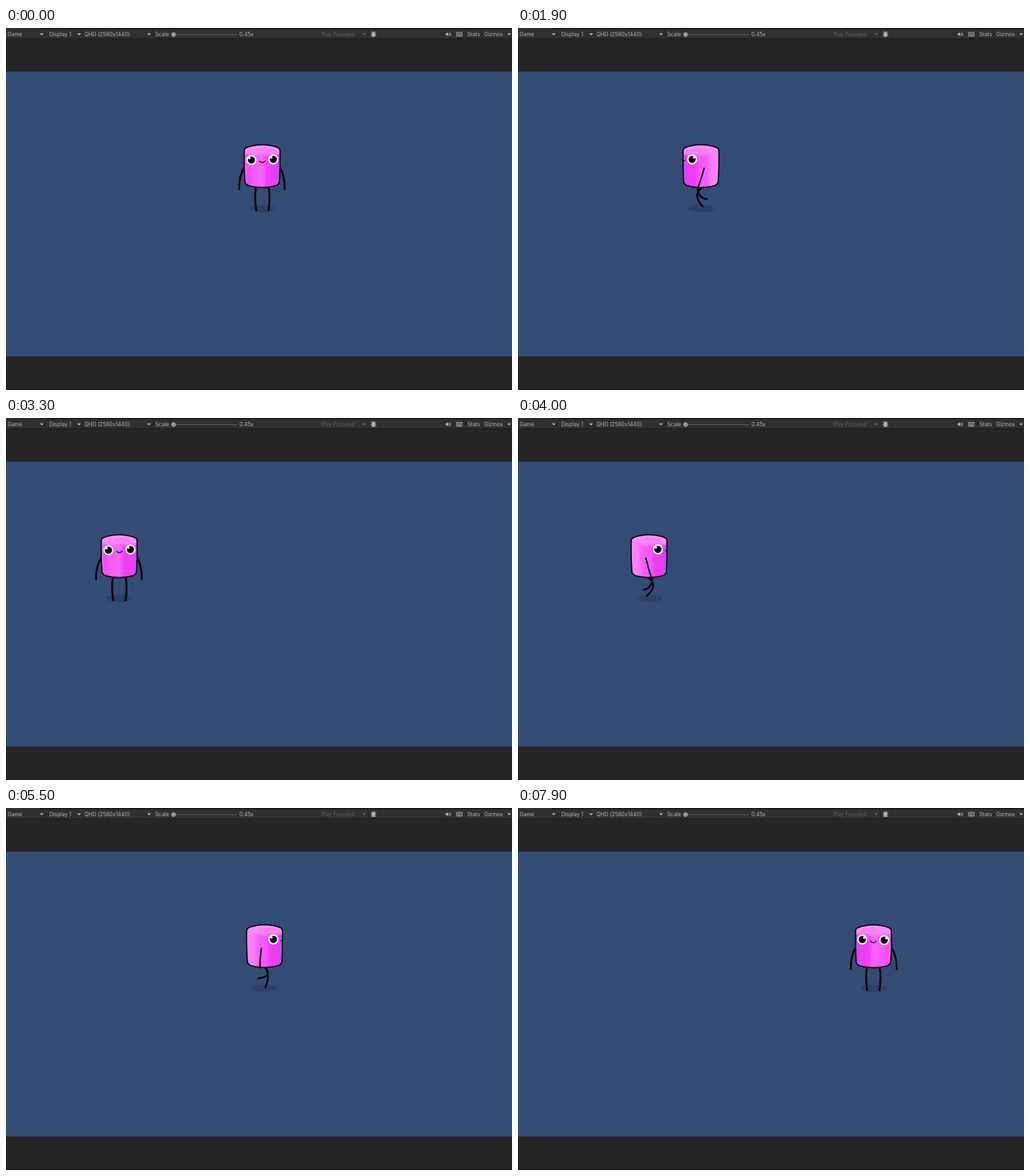
An HTML page for the animation above (8000 ms loop, 800 px wide and 573 px high).

```html
<!DOCTYPE html>
<html lang="en">
<head>
<meta charset="utf-8">
<title>Patrol</title>
<style>
  html, body { margin: 0; width: 100%; height: 100%; overflow: hidden; background: #252525; }
  svg { display: block; width: 800px; height: 573px; }
  text { font: 8.4px Inter, Arial, sans-serif; fill: #b4b4b4; }
  .dim { fill: #646464; }
  .ink { fill: none; stroke: #050308; stroke-linecap: round; stroke-linejoin: round; }
</style>
</head>
<body>
<svg viewBox="0 0 800 573">
  <defs>
    <linearGradient id="front">
      <stop offset="0" stop-color="#fc7dfb"/>
      <stop offset=".1" stop-color="#f548f5"/>
      <stop offset=".25" stop-color="#f65af6"/>
      <stop offset=".5" stop-color="#f766f7"/>
      <stop offset=".62" stop-color="#f240f5"/>
      <stop offset=".84" stop-color="#f03cf2"/>
      <stop offset=".95" stop-color="#c04ff8"/>
      <stop offset="1" stop-color="#d94cf6"/>
    </linearGradient>
    <linearGradient id="side">
      <stop offset="0" stop-color="#fc88fa"/>
      <stop offset=".2" stop-color="#fa7cf9"/>
      <stop offset=".34" stop-color="#f65df7"/>
      <stop offset=".55" stop-color="#f658f7"/>
      <stop offset=".66" stop-color="#f03cf2"/>
      <stop offset=".86" stop-color="#ee3cf4"/>
      <stop offset=".95" stop-color="#bd52f8"/>
      <stop offset="1" stop-color="#d94cf6"/>
    </linearGradient>
    <linearGradient id="cap" x2="0" y2="1">
      <stop offset="0" stop-color="#ff94fb"/>
      <stop offset=".65" stop-color="#fd88fa"/>
      <stop offset="1" stop-color="#fa78f8" stop-opacity="0"/>
    </linearGradient>
    <path id="can" d="M-28.3 194Q-28.4 191 -25 189.3Q-14 184.7 0 184.7T25 189.3Q28.5 191 28.3 194Q28.6 220 27.4 243Q27 247.5 22 249.3Q12 252.4 0 252.4T-22 249.3Q-26.6 247.5 -27.2 243Q-28.8 220 -28.3 194Z"/>
    <clipPath id="inside"><use href="#can"/></clipPath>
    <g id="shade" clip-path="url(#inside)">
      <path d="M-30 180H30V199Q14 208 0 205T-30 199Z" fill="url(#cap)"/>
      <ellipse cx="4" cy="193" rx="14" ry="3.6" fill="#f674f3" opacity=".55"/>
    </g>
    <g id="eye">
      <circle r="8" fill="#fff"/>
      <circle r="5.7" fill="#080508"/>
      <circle cx="-3.2" cy="-3.2" r="1.9" fill="#fff"/>
    </g>
    <path id="caret" d="M-3 -1.5H3L0 1.7Z"/>
  </defs>

  <path fill="#252525" d="M0 0H800V573H0Z"/>
  <path fill="#324c74" d="M0 69H800V520H0Z"/>
  <path fill="#1d1d1d" d="M0 17H1.5V69H0ZM0 520H1.5V573H0ZM0 572H800V573H0Z"/>
  <path fill="#303030" d="M0 2H800V17H0Z"/>
  <path fill="#191919" d="M0 0H800V2H0ZM0 16.5H800V17.5H0Z"/>
  <path fill="#303030" d="M0 0H53V2H0Z"/>
  <path stroke="#252525" d="M62.5 3V17M120.5 3V17M232.5 3V17M572.5 3V17M590.5 3V17M690.5 3V17M708.5 3V17M726.5 3V17M752.5 3V17"/>
  <text x="2.5" y="13">Game</text>
  <text x="68.5" y="13">Display 1</text>
  <text x="124" y="13">QHD (2560x1440)</text>
  <text x="236" y="13">Scale</text>
  <text x="369" y="13">0.45x</text>
  <text x="498.5" y="13" class="dim">Play Focused</text>
  <text x="729.5" y="13">Stats</text>
  <text x="756" y="13">Gizmos</text>
  <g fill="#b4b4b4">
    <use href="#caret" x="56.5" y="10"/>
    <use href="#caret" x="115.5" y="10"/>
    <use href="#caret" x="226" y="10"/>
    <use href="#caret" x="566.5" y="10" class="dim"/>
    <use href="#caret" x="795.5" y="10"/>
    <path d="M265 10H365V11H265Z" fill="#606060"/>
    <circle cx="265" cy="10.3" r="3.6" fill="#999"/>
    <ellipse cx="581" cy="10.3" rx="2.8" ry="4"/>
    <path stroke="#b4b4b4" stroke-width=".9" fill="none" d="M577 6.5L585 14M585 6.5L577 14M576.5 10.3H585.5M579 5L580 7M583 5L582 7"/>
    <path d="M695 8.5H696.8L699 6.3V13.3L696.8 11.3H695Z"/>
    <path stroke="#b4b4b4" fill="none" d="M700.4 8.2Q701.6 9.9 700.4 11.6M702 7Q704 9.9 702 12.8"/>
    <path stroke="#b4b4b4" fill="none" stroke-width=".9" d="M712.3 6.9H721.2V13H712.3Z"/>
    <path stroke="#b4b4b4" stroke-dasharray="1.3 .7" d="M713.5 8.7H720.5M713.5 10.2H720.5"/>
    <path stroke="#b4b4b4" d="M714.5 11.7H719.2"/>
  </g>

  <g id="hero">
    <ellipse cx="0" cy="285.5" rx="20.5" ry="6" fill="#2b4165"/>
    <g id="idle">
      <path id="idleLegs" class="ink" stroke-width="3"/>
      <path id="idleArms" class="ink" stroke-width="2.9"/>
      <g id="idleBody">
        <use href="#can" fill="url(#front)"/>
        <use href="#shade"/>
        <use href="#can" class="ink" stroke-width="1.9"/>
        <use href="#eye" x="-17" y="209"/>
        <use href="#eye" x="17.7" y="208"/>
        <path class="ink" stroke-width="1.4" d="M-4.2 210.8Q.2 215 4.6 210.8"/>
      </g>
    </g>
    <g id="walk">
      <path id="walkLegs" class="ink" stroke-width="2.7"/>
      <use href="#can" fill="url(#side)"/>
      <use href="#shade"/>
      <use href="#can" class="ink" stroke-width="1.9"/>
      <use href="#eye" x="14" y="208"/>
      <path class="ink" stroke-width="1.4" d="M25.8 209.8Q27 211 28.5 210.4"/>
      <path id="walkArm" class="ink" stroke-width="2.3"/>
    </g>
  </g>
</svg>
<script>
const LOOP = 8000, STEP = 100, STRIDE = 650, BREATH = 700;
const $ = id => document.getElementById(id);

// Patrol legs: start, end, from x, to x
const trips = [[1050, 2710, 405, 179], [3790, 6640, 179, 562]];

// Four poses per stride: hip, knee and foot; shoulder, elbow and hand
const legPoses = [
  [5, 252, 5, 268, 5, 284],
  [-2, 252, 13, 265, -2, 284],
  [-4, 252, 26, 262, -8, 271],
  [5, 253, 4, 271, -12, 268.5]
];
const armPoses = [
  [-6, 223, -20, 246, 7, 248.5],
  [-5, 222, 1, 241, 9, 256],
  [-5, 222, -5, 242, -13, 252],
  [-5, 222, -10, 242, -2, 254]
];

function pose(list, phase) {
  const p = ((phase % 1) + 1) % 1 * 4, i = Math.floor(p), u = p - i;
  const e = u * u * (3 - 2 * u), next = list[(i + 1) % 4];
  const v = list[i].map((a, k) => a + (next[k] - a) * e);
  return `M${v[0]} ${v[1]}Q${v.slice(2)}`;
}

function drawWalk(ms) {
  const phase = ms / STRIDE;
  $('walkLegs').setAttribute('d', pose(legPoses, phase) + pose(legPoses, phase + .5));
  $('walkArm').setAttribute('d', pose(armPoses, phase));
}

function drawIdle(ms) {
  const b = (1 - Math.cos(ms / BREATH * 2 * Math.PI)) / 2;
  $('idleBody').setAttribute('transform', `translate(0 ${b * .8})`);
  $('idleLegs').setAttribute('d',
    'M-9.5 251Q-13 269 -9.3 288.5M10.3 251Q13 269 10 288.5');
  const out = 36.3 + b, y = 255 + b * .5;
  $('idleArms').setAttribute('d',
    `M-28 220Q${-37 - b} 235 ${-out} ${y}M28 220Q${36 + b} 235 ${out - .8} ${y}`);
}

function draw(t) {
  let x = 405, dir = 1, since = 0, moving = false;
  for (const [start, end, from, to] of trips) {
    if (t < start) break;
    const heading = Math.sign(to - from);
    moving = t < end;
    x = moving ? from + (to - from) * (t - start) / (end - start) : to;
    dir = moving ? heading : -heading;   // turns round on arrival
    since = moving ? start : end;
  }
  $('hero').setAttribute('transform', `translate(${x} 0) scale(${dir} 1)`);
  $('idle').style.display = moving ? 'none' : '';
  $('walk').style.display = moving ? '' : 'none';
  (moving ? drawWalk : drawIdle)(t - since);
}

const begin = performance.now();
function tick() {
  const t = (performance.now() - begin) % LOOP;
  draw(Math.floor(t / STEP) * STEP);
  requestAnimationFrame(tick);
}
tick();
</script>
</body>
</html>
```
